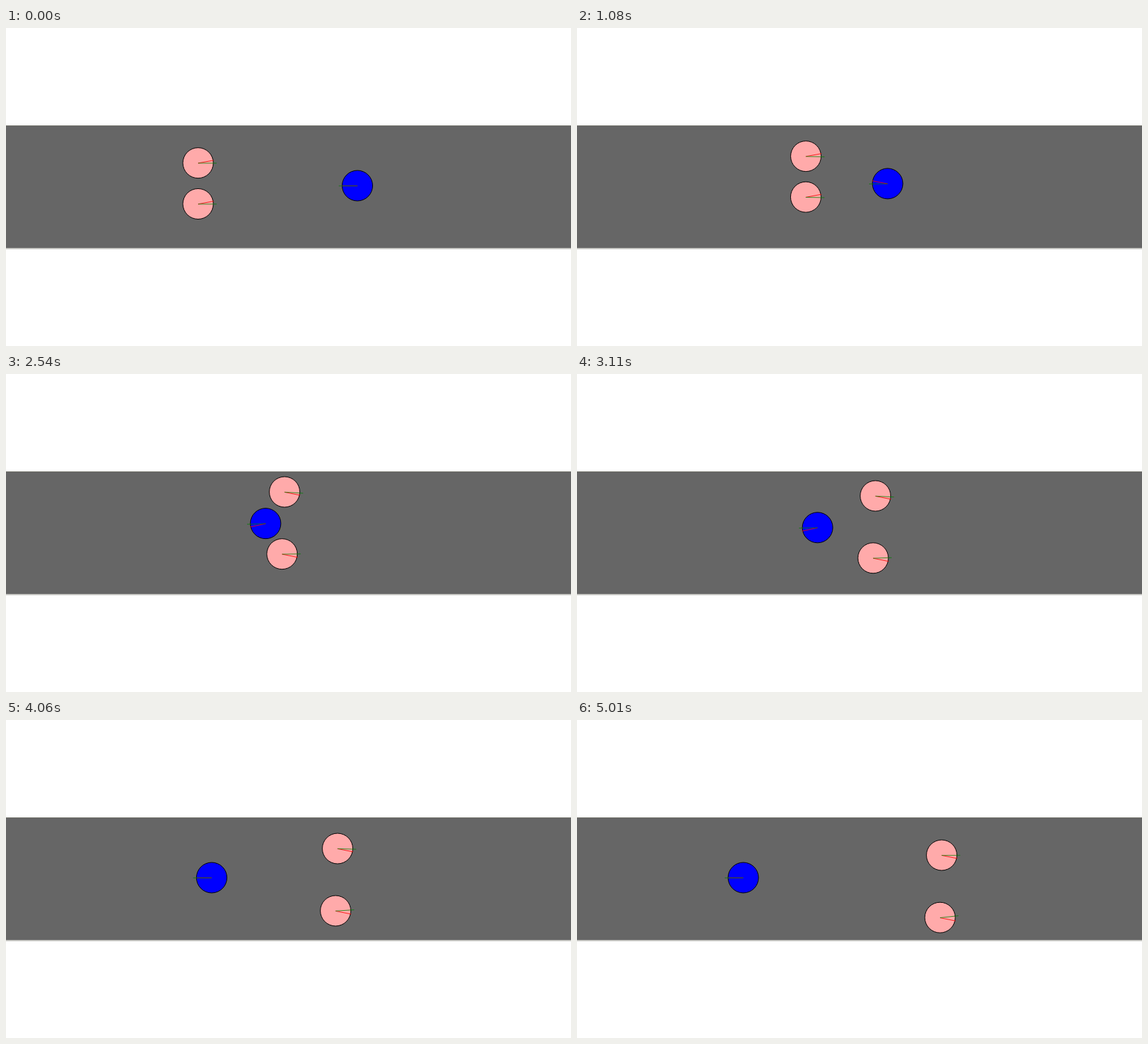
Write an HTML page with a canvas that moves like this. It is 853 by 480 pixels and loops after 5.14 s.

```html
<!DOCTYPE html>
<html lang="en">
<head>
<meta charset="utf-8">
<title>Agents avoiding each other in a corridor</title>
<style>
  html, body { margin: 0; height: 100%; overflow: hidden; background: #fff; }
  canvas { display: block; }
</style>
</head>
<body>
<canvas width="853" height="480"></canvas>
<script>
const ctx = document.querySelector('canvas').getContext('2d');
const RADIUS = 23;
const STEPS = 53;
const LOOP = 5140;

// An agent walks its legs in turn: approach, dodge, carry on.
const leg = (steps, vx, vy) => ({ steps, vx, vy });
const agents = [
  { color: '#ffaaaa', x: 290, y: 203.7, goalX: 850,
    legs: [leg(19, 5.05, -0.92), leg(4, 4.9, -2.8), leg(29, 5, 1)] },
  { color: '#ffaaaa', x: 290, y: 265.5, goalX: 850,
    legs: [leg(18, 5.04, -0.94), leg(3, 3.6, 6), leg(31, 5.05, 1.02)] },
  { color: '#0000ff', x: 530.5, y: 238, goalX: 0,
    legs: [leg(8, -5.73, 0), leg(15, -5.22, -1.03), leg(15, -4.8, 1.03), leg(14, -5.95, 0)] }
];

// Steps alternate between 130 and 60 ms; the order flips twice per loop.
const stepLength = i => i % 2 === (i > 6 && i < 42 ? 1 : 0) ? 130 : 60;

function stepAt(time) {
  let step = 0;
  while (step < STEPS - 1 && time >= stepLength(step)) time -= stepLength(step++);
  return step;
}

function poseAt({ x, y, legs }, step) {
  let heading;
  for (const { steps, vx, vy } of legs) {
    const walked = Math.min(step, steps);
    x += vx * walked;
    y += vy * walked;
    step -= walked;
    heading = { vx, vy };
    if (walked < steps) break;
  }
  return { x, y, ...heading };
}

function ray(x, y, dx, dy, length, color) {
  const scale = length / Math.hypot(dx, dy);
  ctx.strokeStyle = color;
  ctx.beginPath();
  ctx.moveTo(x, y);
  ctx.lineTo(x + dx * scale, y + dy * scale);
  ctx.stroke();
}

function drawAgent(agent, step) {
  const { x, y, vx, vy } = poseAt(agent, step);
  ctx.fillStyle = agent.color;
  ctx.strokeStyle = '#000';
  ctx.beginPath();
  ctx.arc(x, y, RADIUS, 0, 2 * Math.PI);
  ctx.fill();
  ctx.stroke();
  // Red shows the velocity, green the way to the goal.
  ray(x, y + 0.3, vx, vy, 23 + Math.abs(vy), 'rgba(255, 0, 0, 0.85)');
  ray(x, y + 0.3, agent.goalX - x, agent.y - y, 28, 'rgba(0, 128, 0, 0.8)');
}

function bar(y, height, color) {
  ctx.fillStyle = color;
  ctx.fillRect(0, y, 853, height);
}

function draw() {
  const step = stepAt(performance.now() % LOOP);
  bar(0, 480, '#fff');
  bar(147, 185, '#666');
  bar(147, 1, '#74746c');
  bar(332, 2, '#c8c8c4');
  agents.forEach(agent => drawAgent(agent, step));
  requestAnimationFrame(draw);
}
draw();
</script>
</body>
</html>
```
